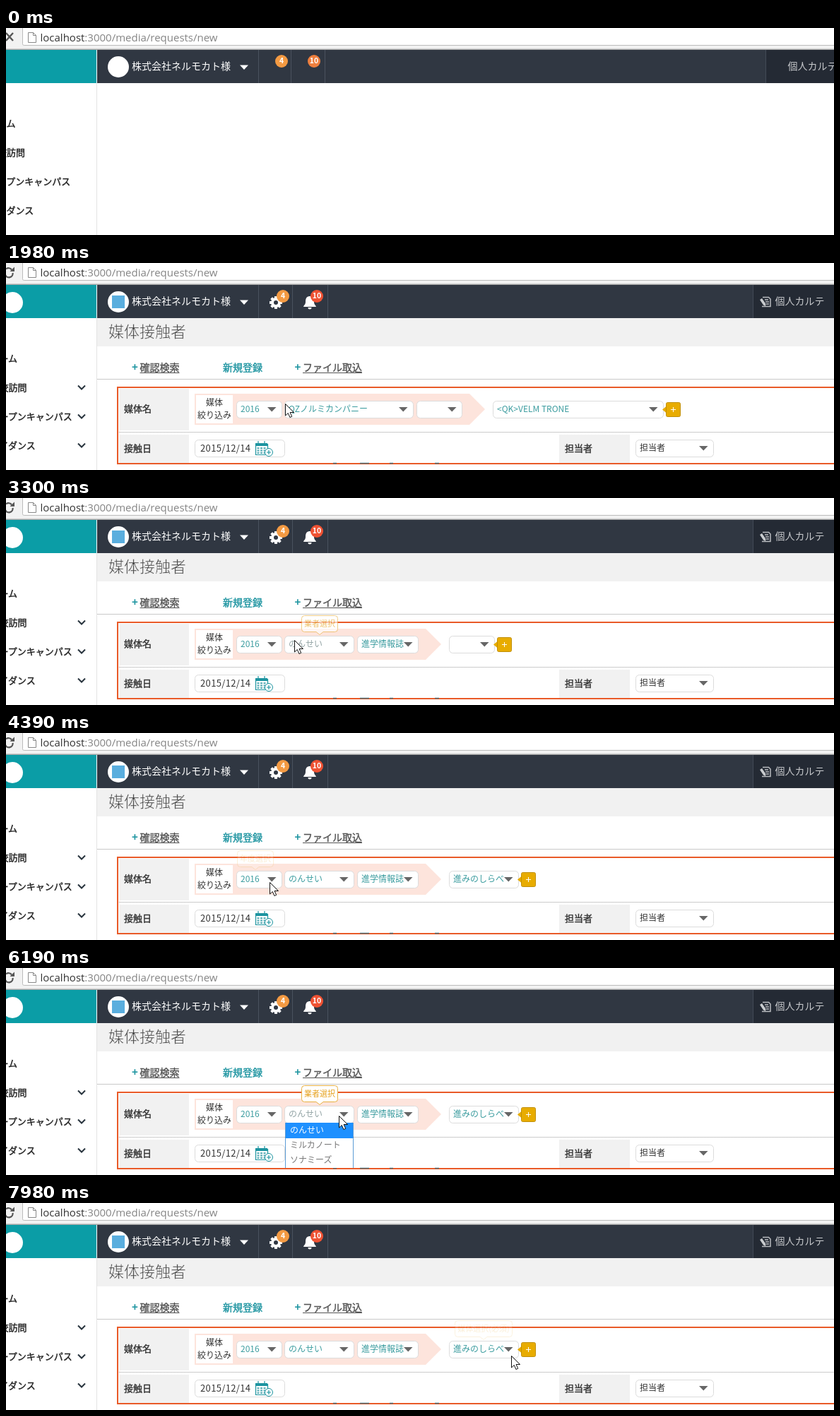
An HTML page for the animation above (8000 ms loop, 1172 by 293 pixels).

```html
<!DOCTYPE html>
<html lang="ja">
<head>
<meta charset="utf-8">
<style>
  html, body { margin: 0; width: 100%; height: 100%; overflow: hidden; background: #fff; }
  svg { display: block; width: 1172px; height: 293px; }
  text { font-family: "Noto Sans CJK JP", "Noto Sans CJK", "Noto Sans", sans-serif; white-space: pre; }
  .url { font-family: "Open Sans", "Noto Sans", sans-serif; }
</style>
</head>
<body>
<svg viewBox="0 0 1172 293" xmlns="http://www.w3.org/2000/svg">
  <g id="page"></g>
  <g id="form"></g>
  <g id="popup"></g>
  <g id="tip"></g>
  <path id="cursor" d="M0 0V16.5L3.8 13 6.4 19 9.2 17.8 6.6 12H12Z" fill="#fff" stroke="#111" stroke-linejoin="round"/>
</svg>
<script>
const LOOP = 8000;
const TEAL = '#0b9da6', LINK = '#1d94a0', VALUE = '#3b9c9f', INK = '#333';
const el = id => document.getElementById(id);

const rect = (x, y, w, h, fill, extra = '') =>
  `<rect x="${x}" y="${y}" width="${w}" height="${h}" fill="${fill}" ${extra}/>`;
const circle = (x, y, r, fill, extra = '') => `<circle cx="${x}" cy="${y}" r="${r}" fill="${fill}" ${extra}/>`;
const line = (d, color, width = 1, extra = '') =>
  `<path d="${d}" fill="none" stroke="${color}" stroke-width="${width}" ${extra}/>`;
const shape = (d, fill) => `<path d="${d}" fill="${fill}"/>`;
// y is the vertical middle of the glyphs
const text = (x, y, size, fill, s, extra = '') =>
  `<text x="${x}" y="${y + size * 0.36}" font-size="${size}" fill="${fill}" ${extra}>${s}</text>`;
// medium weight: regular glyphs with a hairline outline
const medium = (x, y, size, fill, s) =>
  text(x, y, size, fill, s, `stroke="${fill}" stroke-width=".4"`);
const MID = 'text-anchor="middle"';

const field = (x, y, w) => rect(x + .5, y + .5, w, 24, '#fff', 'rx="5" stroke="#dcdcdc"');
const select = (x, y, w, label = '', color = VALUE) =>
  field(x, y, w) + text(x + 6, y + 12, 12, color, label) +
  shape(`M${x + w - 20} ${y + 9}h12.500l-6.250 6.500z`, '#666');

function browserBar(loading) {
  const action = loading
    ? line('M0 7L10 18M10 7L0 18', '#555', 2.4)
    : line('M0 8.500A5.500 5.500 0 0 1 8 9.500M9.500 14A5.500 5.500 0 0 1 -1 17', '#555', 2.2) + shape('M12 5.500V12H5.500z', '#555');
  return rect(0, 0, 1172, 30, '#f2f2f2') + rect(23.5, -5, 1160, 29.5, '#fff', 'rx="2" stroke="#bbb"') +
    rect(0, 29.5, 1172, 1.5, '#a9a9a9') + action +
    '<path d="M31.5 6.5h7l4 4v10h-11zM38.5 6.5v4h4" fill="#fff" stroke="#888"/>' +
    '<text class="url" x="48.500" y="19" font-size="15" fill="#333">localhost<tspan fill="#858585">:3000/media/requests/new</tspan></text>';
}

function gear(x, y) {
  let teeth = '';
  for (let a = 0; a < 360; a += 45)
    teeth += rect(x - 2, y - 9, 4, 5, '#fff', `transform="rotate(${a} ${x} ${y})"`);
  return teeth + circle(x, y, 5, 'none', 'stroke="#fff" stroke-width="4"');
}

const badge = (x, fill, s) => circle(x, 47, 9, fill) +
  text(x, 46.5, 10.5, '#fff', s, MID + ' font-weight="700"');

function header(icons, ready, logo) {
  const right = ready ? 1057 : 1075;
  const seps = icons ? [357, 405, 455] : [357, 403, 451];
  let s = rect(0, 31, 128, 47, TEAL) + rect(129, 31, 1043, 47, '#303742') +
    rect(right, 31, 1172 - right, 47, '#242a34') + line(`M${right + .5} 31V78`, '#424a56') +
    seps.map(x => line(`M${x + .5} 31V78`, '#4a525e')).join('') +
    circle(159, 55, 15, '#fff') +
    text(178, 54, 14, '#fff', '株式会社ネルモカト様') + shape('M331 52.5h12l-6 6.5z', '#fff') +
    text(right + 31.5, 54, 14, '#c6c8cb', '個人カルテ');
  if (logo) s += circle(9, 56, 15, '#fff');
  if (icons) {
    s += rect(150, 46, 18, 18, '#5aaede') + gear(382, 56) +
      shape('M430 47c5 0 6 4 6 8 0 4 2 4 3 7H421c1-3 3-3 3-7 0-4 1-8 6-8zM427.5 63h5a2.5 2.5 0 0 1-5 0z', '#fff') +
      `<g transform="translate(${right + 9} 47)">` +
      line('M5 1.500H13.500L16 4V14.500H4', '#b9bcc0', 1.5) + line('M8 5h5M9 8h5M10 11h4', '#b9bcc0', 1.5) +
      shape('M1 5L4 3 9.500 11 9 14 6 12.500z', '#c9cccf') + '</g>';
  }
  return s + badge(icons ? 392 : 390, '#f39a43', '4') +
    badge(icons ? 440 : 436, icons ? '#ef5233' : '#ee7f3e', '10');
}

function sidebar(icons) {
  const x = icons ? -22.5 : -25;
  return line('M128.5 78V293', '#e3e3e3') +
    ['ホーム', '学校訪問', 'オープンキャンパス', 'ガイダンス'].map((s, i) => {
      const y = 135 + 41 * i;
      const chevron = icons && i ? line(`M102 ${y - 2.5}l5 5 5-5`, '#26323c', 2) : '';
      return medium(x, y, 13, '#222', s) + chevron;
    }).join('');
}

function content() {
  const tab = (x, s) => text(x - 11.5, 147.5, 15, LINK, '+', 'font-weight="700"') +
    medium(x, 148, 14, '#555', s) + line(`M${x} 155.5h${s.length * 14}`, '#555');
  let calendar = rect(353, 255, 17, 4, LINK) + line('M353.5 256V271.5H370.5V256M357 252v4M366 252v4', LINK, 1.2);
  for (let i = 0; i < 9; i++) calendar += rect(355.5 + i % 3 * 4.5, 261 + Math.floor(i / 3) * 3.4, 3, 2.2, '#5fb0b8');
  calendar += circle(372, 268, 5.5, '#fff', `stroke="${LINK}"`) + line('M369 268h6M372 265v6', LINK, 1.2);
  return rect(129, 78, 1043, 40, '#f1f1f1') +
    // a background-coloured outline thins the strokes to a light weight
    text(145, 97, 22, '#444', '媒体接触者', 'stroke="#f1f1f1" stroke-width=".6"') +
    tab(189.5, '確認検索') + medium(307, 148, 14, LINK, '新規登録') + tab(420, 'ファイル取込') +
    line('M129 164.5H1172', '#c8c8c8') +
    rect(160, 178, 99, 59, '#f1f1f1') + rect(160, 243, 99, 40, '#f1f1f1') + rect(783, 243, 100, 40, '#f1f1f1') +
    line('M160 239.5H1172', '#999', 1, 'stroke-dasharray="1 1"') +
    medium(167, 206, 13, INK, '媒体名') + medium(167, 262, 13, INK, '接触日') +
    medium(791, 262, 13, INK, '担当者') +
    field(267, 250, 127) + text(275, 262, 13, INK, '2015/12/14', 'letter-spacing=".35"') + calendar +
    select(891, 250, 110, '担当者', INK) +
    rect(158, 176, 1030, 108, 'none', 'stroke="#e95a28" stroke-width="2"');
}

// Each state: start, then [width, label] for the four selects
const YEAR = [64, '2016'], EMPTY = [64, ''], VENDOR = [98, 'のんせい'], KIND = [86, '進学情報誌'];
const COMPANY = [182, 'QZノルミカンパニー'], BRAND = [241, '&lt;QK&gt;VELM TRONE'];
const STATES = [
  [1070, EMPTY, EMPTY, EMPTY, EMPTY],
  [1600, YEAR, COMPANY, EMPTY, BRAND],
  [2210, YEAR, COMPANY, KIND, BRAND],
  [2440, YEAR, VENDOR, KIND, EMPTY],
  [3600, YEAR, VENDOR, KIND, [98, '進みのしらべ']],
];

function mediaRow(t) {
  const [, year, vendor, kind, media] = STATES.filter(s => s[0] <= t).pop();
  const kindX = 394 + vendor[0] + 5, body = kindX + kind[0] + 11;
  const mediaX = body + 33, plus = mediaX + media[0] + 4;
  const dim = (t >= 3070 && t < 4290) || (t >= 5350 && t < 6650);
  const marks = t >= 1600
    ? line('M463 283.5h5M501 283.5h13M543 283.5h5M607 283.5h6', '#4d6a70', 1.5) : '';
  return shape(`M267 185H${body}L${body + 22} 207L${body} 229H267z`, '#fde4dc') +
    rect(269, 187, 52, 40, '#fff') +
    text(295, 197.5, 12, INK, '媒体', MID) + text(295, 215.5, 12, INK, '絞り込み', MID) +
    select(326, 195, ...year) + select(394, 195, ...vendor, dim ? '#92a3a4' : VALUE) +
    select(kindX, 195, ...kind) + select(mediaX, 195, ...media) +
    shape(`M${plus - 5} 207.5l6-5v10z`, '#e8ac00') +
    rect(plus + .5, 197.5, 20, 20, '#e8ac00', 'rx="2" stroke="#c08f08"') +
    line(`M${plus + 7} 207.5h7M${plus + 10.5} 204v7`, '#fff', 1) + marks;
}

function dropdown(x, w, h, items) {
  return rect(x + .5, 219, w - 1, h, '#fff') +
    line(`M${x + .5} 219v${h}M${x + w - .5} 219v${h}`, '#5b9bd5') +
    rect(x + 1, 219, w - 2, 22, '#1e90ff') +
    items.map((s, i) => text(x + 7, 229.5 + 21 * i, 12, i ? '#777' : '#fff', s)).join('');
}

function popup(t) {
  if (t >= 5800 && t < 6270) return dropdown(395, 97, 64, ['のんせい', 'ミルカノート', 'ソナミーズ']);
  if (t >= 7080 && t < 7750) return dropdown(498, 85, 23, ['進学情報誌']);
  return '';
}

// Start, centre, width, label
const TIPS = [
  [3060, 444, 51, '業者選択'], [4290, 353, 51, '年度選択'], [5350, 444, 51, '業者選択'],
  [6650, 540, 51, '分類選択'], [7890, 676, 81, '媒体選択(必須)'],
];
const FADE = 650;
const currentTip = t => TIPS.filter(s => s[0] <= t).pop();

function tooltip([, x, w, label]) {
  const l = x - w / 2, r = x + w / 2;
  return `<path d="M${l + 4} 166.5H${r - 4}q4 0 4 4V185.5q0 4 -4 4H${x + 5}L${x} 193.5L${x - 5} 189.5H${l + 4}q-4 0 -4 -4V170.5q0 -4 4 -4z" fill="#fff" stroke="#e8b040"/>` +
    text(x, 178, 11, '#e6a11c', label, MID);
}

// cubic-bezier(.25, .1, .25, 1)
function ease(p) {
  let lo = 0, hi = 1;
  for (let i = 0; i < 20; i++) {
    const u = (lo + hi) / 2;
    if (.75 * u * (1 - u) + u ** 3 < p) lo = u; else hi = u;
  }
  return .3 * lo * (1 - lo) ** 2 + 3 * lo * lo * (1 - lo) + lo ** 3;
}

const PATH = [
  [1070, 612, 296], [1200, 607, 279], [1400, 607, 279], [1820, 440, 249], [1980, 395, 199],
  [3060, 395, 199], [3150, 408, 201], [3400, 408, 201], [3910, 440, 212], [4270, 440, 212],
  [4380, 373, 211], [5330, 373, 211], [5700, 471, 209], [6640, 471, 209], [7000, 569, 212],
  [7880, 569, 212], [7970, 715, 216], [LOOP, 715, 216],
];

function cursorAt(t) {
  const i = Math.max(1, PATH.findIndex(k => k[0] > t));
  const [t0, x0, y0] = PATH[i - 1], [t1, x1, y1] = PATH[i];
  const p = Math.max(0, (t - t0) / (t1 - t0));
  return [x0 + (x1 - x0) * p, y0 + (y1 - y0) * p].map(Math.round);
}

const shown = {};
function put(id, markup) {
  if (shown[id] !== markup) el(id).innerHTML = shown[id] = markup;
}

function render(t) {
  const icons = t >= 600, ready = t >= 1070;
  put('page', browserBar(t < 670) + header(icons, ready, t >= 140) + sidebar(icons) + (ready ? content() : ''));
  put('form', ready ? mediaRow(t) : '');
  put('popup', popup(t));
  const tip = currentTip(t);
  put('tip', tip ? tooltip(tip) : '');
  el('tip').setAttribute('opacity', tip ? ease(Math.min(1, (t - tip[0]) / FADE)) : 0);
  el('cursor').setAttribute('visibility', ready ? 'visible' : 'hidden');
  el('cursor').setAttribute('transform', `translate(${cursorAt(t).map(v => v + .5)})`);
}

const start = performance.now();
function tick() {
  render((performance.now() - start) % LOOP);
  requestAnimationFrame(tick);
}
tick();
</script>
</body>
</html>
```
